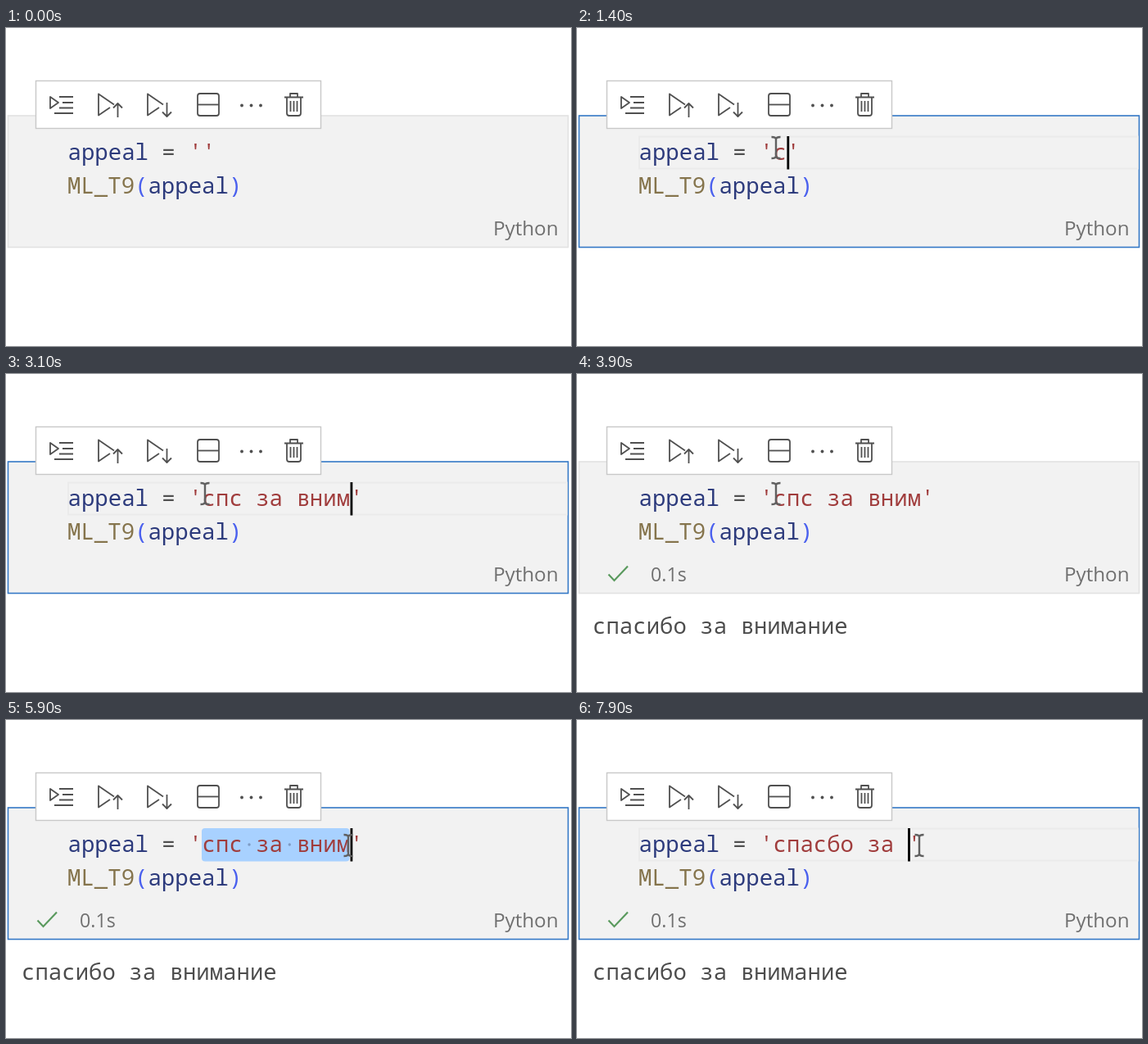
Write an HTML page that moves like this. It is 690 px wide and 388 px high and loops after 8000 ms.

```html
<!DOCTYPE html>
<html lang="ru">
<head>
<meta charset="utf-8">
<title>Notebook cell</title>
<style>
html, body { margin: 0; width: 100%; height: 100%; overflow: hidden; background: #fff; }
svg { display: block; width: 690px; height: 388px; }
text { white-space: pre; }
.code { font: 27.35px "Noto Sans Mono", "DejaVu Sans Mono", monospace; }
.ui { font: 24.2px "Open Sans", "Noto Sans", sans-serif; fill: #707070; }
.name { fill: #2c3a7c; }
.str { fill: #a03c3c; }
.func { fill: #85744c; }
.paren { fill: #4a60ee; }
.icons { fill: none; stroke: #505050; stroke-width: 1.8; stroke-linejoin: round; }
</style>
</head>
<body>
<svg viewBox="0 0 690 388">
  <rect id="cell" x="2.5" y="107" width="684" height="160.5" fill="#f2f2f2" stroke-width="1.6"/>
  <rect id="line" x="76" y="132.5" width="609" height="39" fill="none" stroke="#ebebeb" stroke-width="2"/>
  <rect id="selection" x="239" y="132" height="40.5" rx="4" fill="#a8d1ff"/>
  <g id="dots" fill="#7f9cc4">
    <circle cx="297" cy="152" r="1.7"/>
    <circle cx="346.3" cy="152" r="1.7"/>
  </g>

  <rect x="36.5" y="64.5" width="348" height="58" fill="#fff" stroke="#c8c8c8" stroke-width="1.4"/>
  <g class="icons">
    <path d="M54 84V98L64 91ZM65 84H82M69 91H82M65 97.5H82M59 104H82"/>
    <path id="play" d="M127 97L113 106.5V80.500L132 93.500"/>
    <use href="#play" x="60"/>
    <path d="M136.500 109V92M131 97.500L136.500 92L142 97.500"/>
    <path d="M196.500 91V108M191 102.500L196.500 108L202 102.500"/>
    <rect x="234" y="80" width="26" height="27" rx="3"/>
    <path d="M234 93.500H260"/>
    <path d="M340 84.500H363M347 84V80H356V84M343 85V104Q343 107 346 107H357Q360 107 360 104V85M347.500 89V102M351.500 89V102M355.500 89V102"/>
    <g fill="#505050" stroke="none">
      <circle cx="288" cy="94.500" r="1.9"/>
      <circle cx="299.500" cy="94.500" r="1.9"/>
      <circle cx="311" cy="94.500" r="1.9"/>
    </g>
  </g>

  <text class="code" x="75.5" y="160.5"><tspan class="name">appeal</tspan><tspan fill="#505050"> = </tspan><tspan id="value" class="str"></tspan></text>
  <text class="code" x="75" y="201.5"><tspan class="func">ML_T9</tspan><tspan class="paren">(</tspan><tspan class="name">appeal</tspan><tspan class="paren">)</tspan></text>
  <text class="ui" x="674.5" y="252.5" text-anchor="end">Python</text>

  <g id="done">
    <path d="M38.500 244.500L45.500 252L62 234.500" fill="none" stroke="#5a9a5e" stroke-width="2.2"/>
    <text class="ui" x="90" y="252.5" style="font-size:23.2px">0.1s</text>
  </g>
  <text id="output" class="code" x="19" y="317" fill="#4c4c4c">спасибо за внимание</text>

  <rect id="caret" y="132" width="2.8" height="40.5" fill="#000"/>
  <path id="mouse" d="M-5.500 -13Q0 -13 0 -10Q0 -13 5.500 -13M0 -10V10M-5.500 13Q0 13 0 10Q0 13 5.500 13" fill="none" stroke="#606060" stroke-width="2.4"/>
</svg>
<script>
const LOOP = 8000, STEP = 100, CHAR = 16.41, TEXT_X = 240;
const FIRST = 'спс за вним', SECOND = 'спасбо за ';
const firstKeys = [1400, 1500, 1600, 1700, 1900, 2200, 2300, 2500, 2600, 2700, 2900];
const secondKeys = [6900, 7000, 7100, 7200, 7300, 7500, 7600, 7700, 7800, 7900];
const mousePath = [[100, 650, 160], [600, 243, 146], [4800, 243, 146], [5100, 331.5, 152], [5600, 418, 153]];

const el = id => document.getElementById(id);
const show = (id, on) => el(id).setAttribute('visibility', on ? 'visible' : 'hidden');
const within = (t, from, to) => t >= from && t < to;
const typed = (text, keys, t) => text.slice(0, keys.filter(key => key <= t).length);

function mouseAt(t) {
  const next = mousePath.findIndex(point => point[0] > t);
  if (next < 0) return mousePath.at(-1).slice(1);
  if (next === 0) return mousePath[0].slice(1);
  const [t0, x0, y0] = mousePath[next - 1], [t1, x1, y1] = mousePath[next];
  const k = (t - t0) / (t1 - t0);
  return [x0 + (x1 - x0) * k, y0 + (y1 - y0) * k];
}

function draw(t) {
  const text = t < 6300 ? typed(FIRST, firstKeys, t) : typed(SECOND, secondKeys, t);
  el('value').textContent = `'${text}'`;

  const focused = within(t, 700, 3300) || t >= 4800;
  el('cell').setAttribute('stroke', focused ? '#3478c6' : '#e2e2e2');

  // The selection trails the dragged pointer by one step.
  const dragging = within(t, 4800, 6300);
  const dragged = Math.round((mouseAt(t - STEP)[0] - TEXT_X) / CHAR);
  const selected = dragging ? Math.min(FIRST.length, dragged) : 0;
  el('selection').setAttribute('width', selected * CHAR);
  [...el('dots').children].forEach((dot, i) =>
    dot.setAttribute('visibility', selected > [3, 6][i] ? 'visible' : 'hidden'));
  show('line', focused && !selected);

  el('caret').setAttribute('x', TEXT_X + (dragging ? selected : text.length) * CHAR);
  show('caret', focused && !within(t, 1200, 1400));

  show('done', t >= 3400);
  show('output', t >= 3500);
  show('mouse', t >= 100);
  el('mouse').setAttribute('transform', `translate(${mouseAt(t)})`);
}

function frame(now) {
  draw(Math.floor(now % LOOP / STEP) * STEP);
  requestAnimationFrame(frame);
}
requestAnimationFrame(frame);
</script>
</body>
</html>
```
